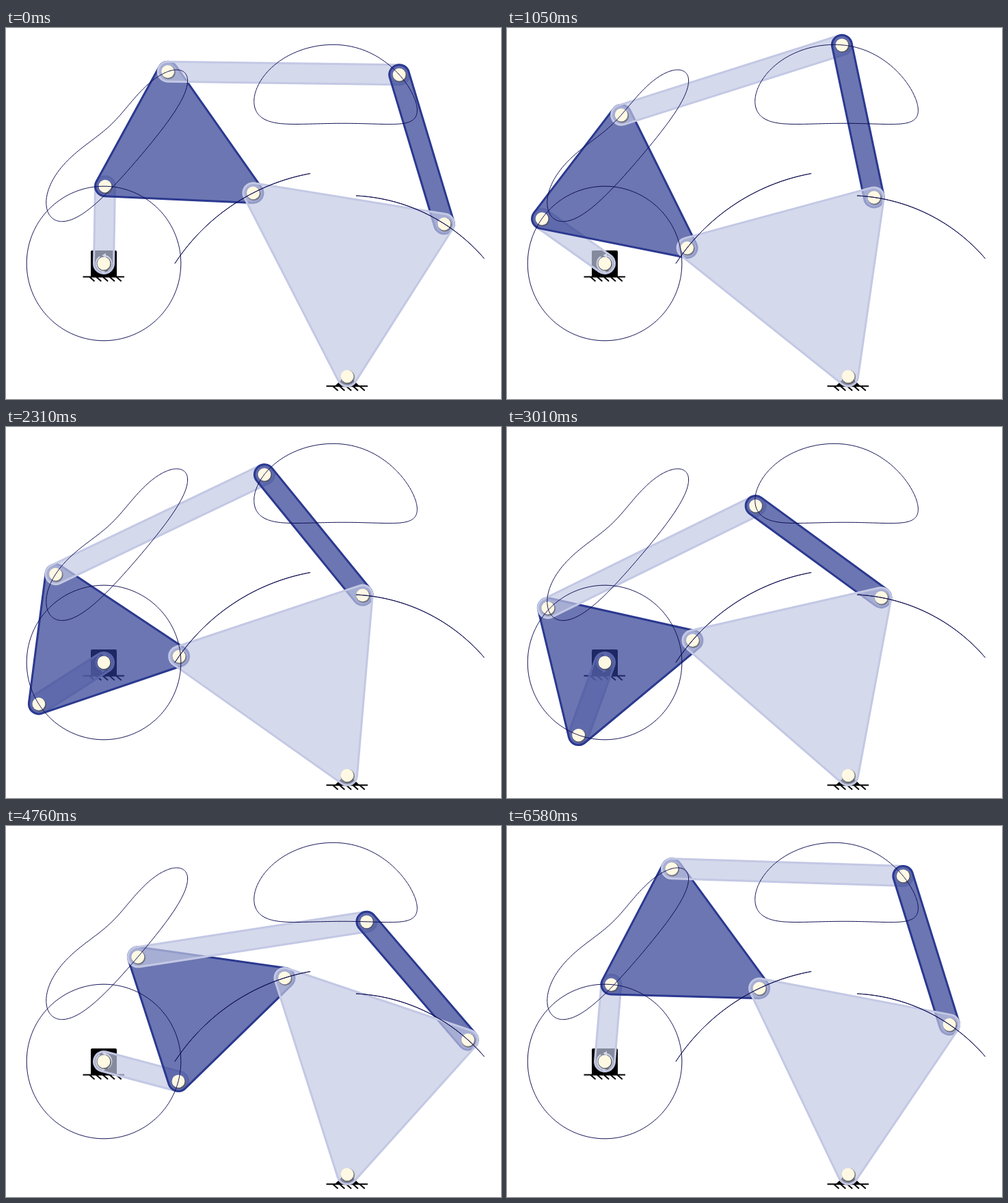
These frames come from a looping animation (724x542 px, 6650 ms). An HTML page with a canvas:

```html
<!DOCTYPE html>
<html lang="en">
<head>
<meta charset="utf-8">
<title>Six-bar linkage</title>
<style>
html, body { margin: 0; width: 100%; height: 100%; overflow: hidden; background: #fff; }
canvas { display: block; }
</style>
</head>
<body>
<canvas id="stage" width="724" height="542"></canvas>
<script>
const ctx = document.getElementById('stage').getContext('2d');
const RAD = Math.PI / 180;
const STEP = 70, STEPS = 95;
const LIGHT = '195,200,228', DARK = '43,57,144';

// Fixed pivots and link lengths
const O = { x: 143, y: 344 }, G = { x: 499, y: 508.8 };
const OA = 112.8, AB = 216.7, AC = 191, GB = 301.1, GD = 264.1, CE = 338.5, DE = 227.5;
const ANGLE_BAC = 63.87 * RAD, ANGLE_BGD = 59.67 * RAD;

// Crank angle in degrees at chosen steps
const CRANK = [[0, 89], [7, 114.3], [23, 174.9], [43, 250.1], [57, 303.1], [80, 391], [94, 445.2], [95, 449]];

function crankAngle(n) {
  const i = CRANK.findIndex(k => k[0] > n);
  const [n0, a0] = CRANK[i - 1], [n1, a1] = CRANK[i];
  return a0 + (a1 - a0) * (n - n0) / (n1 - n0);
}

const polar = (p, r, a) => ({ x: p.x + r * Math.cos(a), y: p.y + r * Math.sin(a) });
const heading = (p, q) => Math.atan2(q.y - p.y, q.x - p.x);

// Upper meeting point of two circles
function meet(p, rp, q, rq) {
  const d = Math.hypot(q.x - p.x, q.y - p.y);
  const turn = Math.acos((rp * rp + d * d - rq * rq) / (2 * rp * d));
  return polar(p, rp, heading(p, q) - turn);
}

function solve(deg) {
  const A = polar(O, OA, -deg * RAD);
  const B = meet(A, AB, G, GB);
  const C = polar(A, AC, heading(A, B) - ANGLE_BAC);
  const D = polar(G, GD, heading(G, B) + ANGLE_BGD);
  const E = meet(C, CE, D, DE);
  return { A, B, C, D, E };
}

const traces = new Path2D();
for (const key of 'ABCDE') {
  for (let deg = 0; deg <= 360; deg++) {
    const p = solve(deg)[key];
    deg ? traces.lineTo(p.x, p.y) : traces.moveTo(p.x, p.y);
  }
}

// Rounded body around points listed clockwise
function body(rgb, ...pts) {
  const n = pts.length;
  ctx.beginPath();
  pts.forEach((p, i) => {
    const from = heading(pts[(i + n - 1) % n], p) - Math.PI / 2;
    const to = heading(p, pts[(i + 1) % n]) - Math.PI / 2;
    ctx.arc(p.x, p.y, 14.5, from, to);
  });
  ctx.closePath();
  ctx.fillStyle = `rgba(${rgb},.69)`;
  ctx.fill();
  ctx.strokeStyle = `rgb(${rgb})`;
  ctx.lineWidth = 3;
  ctx.stroke();
}

function disc(x, y, r, fill) {
  ctx.beginPath();
  ctx.arc(x, y, r, 0, 2 * Math.PI);
  ctx.fillStyle = fill;
  ctx.fill();
}

function pin(p) {
  disc(p.x + 1, p.y + 1.2, 10.2, 'rgba(75,75,70,.55)');
  disc(p.x, p.y, 9.4, '#fff9e3');
}

function ground(x, y) {
  ctx.strokeStyle = '#000';
  ctx.lineWidth = 2;
  ctx.beginPath();
  ctx.moveTo(x - 30.5, y);
  ctx.lineTo(x + 30, y);
  for (let i = 0; i < 5; i++) {
    const h = x - 21 + i * 9.8;
    ctx.moveTo(h, y);
    ctx.lineTo(h + 7.5, y + 6.5);
  }
  ctx.stroke();
}

function turnMark() {
  ctx.strokeStyle = ctx.fillStyle = '#fff';
  ctx.lineWidth = 1.6;
  for (const side of [-1, 1]) {
    ctx.save();
    ctx.translate(O.x, O.y);
    ctx.scale(side, side);
    ctx.beginPath();
    ctx.arc(0, 0, 11.5, -75 * RAD, 60 * RAD);
    ctx.stroke();
    ctx.beginPath();
    ctx.moveTo(-2.5, -12);
    ctx.lineTo(3, -15);
    ctx.lineTo(3, -8.5);
    ctx.fill();
    ctx.restore();
  }
}

function draw(n) {
  const { A, B, C, D, E } = solve(crankAngle(n));
  ctx.fillStyle = '#fff';
  ctx.fillRect(0, 0, 724, 542);

  ctx.fillStyle = '#000';
  ctx.beginPath();
  ctx.roundRect(124, 325, 38, 39, 2);
  ctx.fill();
  ground(O.x, 363.5);
  turnMark();

  ctx.fillStyle = '#000';
  ctx.beginPath();
  ctx.moveTo(G.x, G.y - 3);
  ctx.lineTo(G.x + 18, 523);
  ctx.lineTo(G.x - 18, 523);
  ctx.fill();
  ground(G.x, 523.3);

  body(LIGHT, O, A);
  body(DARK, A, C, B);
  body(LIGHT, C, E);
  body(DARK, D, E);
  body(LIGHT, B, D, G);
  [O, G, A, B, C, D, E].forEach(pin);

  ctx.strokeStyle = '#0c0c50';
  ctx.lineWidth = 1;
  ctx.stroke(traces);
}

function tick() {
  draw(Math.floor(performance.now() / STEP) % STEPS);
  requestAnimationFrame(tick);
}
tick();
</script>
</body>
</html>
```
